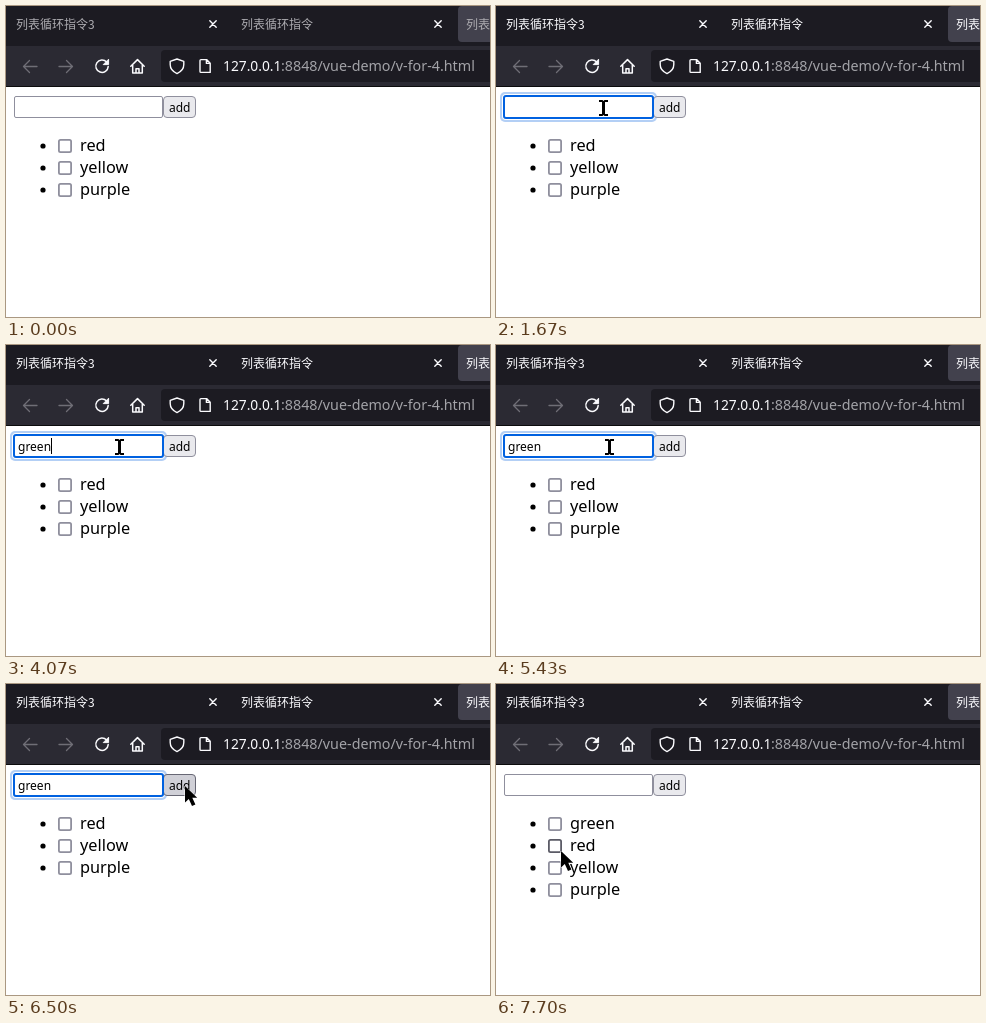
Write an HTML page that moves like this. It is 484 px wide and 311 px high and loops after 8 s.

```html
<!DOCTYPE html>
<html lang="zh">
<head>
<meta charset="utf-8">
<title>v-for</title>
<style>
  html, body { margin: 0; width: 100%; height: 100%; overflow: hidden; background: #fff; }
  svg { display: block; width: 484px; height: 311px; }
  text { white-space: pre; }
  .tab { font: 500 12px "Noto Sans CJK SC", "Noto Sans CJK", sans-serif; }
  .url { font: 14.3px "Noto Sans", sans-serif; fill: #a3a3a8; }
  .host { font-size: 13.8px; fill: #fbfbfe; }
  .small { font: 12px "Noto Sans", sans-serif; }
  .item { font: 16.3px "Noto Sans", sans-serif; }
  .icon { fill: none; stroke: #fbfbfe; stroke-width: 1.5; stroke-linecap: round; stroke-linejoin: round; }
</style>
</head>
<body>
<svg viewBox="0 0 484 311">
  <rect width="484" height="311" fill="#fff"/>
  <rect width="484" height="40" fill="#1c1b22"/>
  <rect x="452" y="0" width="40" height="36" rx="4" fill="#42414d"/>
  <g id="tabs" class="tab">
    <text x="10" y="22.5">列表循环指令3</text>
    <text x="235" y="22.5">列表循环指令</text>
    <text x="460" y="22.5">列表循环指令</text>
  </g>
  <rect y="40" width="484" height="40" fill="#2b2a33"/>
  <rect y="80" width="484" height="1" fill="#0c0c0d"/>
  <rect x="155" y="44" width="340" height="32" rx="4" fill="#1c1b22"/>

  <g class="icon">
    <path stroke-width="1.4" d="M203.8 14.8l6.4 6.4m0-6.4l-6.4 6.4M428.8 14.8l6.4 6.4m0-6.4l-6.4 6.4"/>
    <path stroke="#6f6e76" stroke-width="1.3" d="M31 60.5H17.5m6-6l-6 6 6 6M53 60.5H66.5m-6-6l6 6-6 6"/>
    <path d="M100.6 56A6.2 6.2 0 1 0 102.2 60.6"/>
    <path fill="#fbfbfe" stroke-width="1" d="M102.6 53.6v5h-5z"/>
    <path d="M124.8 60.2L131.5 53.6l6.7 6.6M126.7 59v8h9.6v-8M130 67v-4.2h3V67"/>
    <path stroke-width="1.4" d="M171 53l6.8 2.4v3.2c0 4.2-2.6 7.2-6.8 9-4.2-1.8-6.8-4.8-6.8-9v-3.2z"/>
    <path stroke-width="1.4" d="M195 53.6h5.6l3.6 3.6v9.2h-9.2a1 1 0 0 1-1-1V54.6a1 1 0 0 1 1-1zM200.4 53.8v3.6h3.6"/>
  </g>
  <text class="url" y="65"><tspan class="host" x="217">127.0.0.1</tspan><tspan x="275">:8848/vue-demo/v-for-4.html</tspan></text>

  <g id="ring">
    <rect x="4" y="86" width="157" height="30" rx="5" fill="#b3cff5"/>
    <rect x="6" y="88" width="153" height="26" rx="4" fill="#fff"/>
  </g>
  <rect id="btn" x="157.5" y="90.5" width="32" height="21" rx="3.5"/>
  <text class="small" x="163" y="106">add</text>
  <rect id="field" fill="#fff"/>
  <text id="typed" class="small" x="12" y="106"></text>
  <rect id="caret" y="93" width="1" height="16"/>
  <g id="list"></g>

  <path id="beam" d="M-4.5 -8.5H-1L0 -7.5 1 -8.5H4.5V-6.5H1.5V5.5H4.5V7.5H1L0 6.5-1 7.5H-4.5V5.5H-1.5V-6.5H-4.5z"/>
  <path id="arrow" stroke="#fff" stroke-width="1" paint-order="stroke" d="M0 0V16.5L3.8 13 7 20 10.4 18.5 7.3 11.8H12.2z"/>
</svg>
<script>
const LOOP = 8000, STEP = 100 / 3;
const FOCUS = 1130, BLUR = 6700, ADDED = 6770;
const WORD = "green", COLORS = ["red", "yellow", "purple"];
const KEYS = [2430, 2670, 3000, 3170, 4070];
const CARET_X = [12, 19, 24, 31, 38, 45];
const BLINK = [1130, 1670, 2200, 2770, 3000, 3300, 3830, 4370, 4900, 5430, 5970, 6500];
// pointer path: time, x, y, ease-out power
const PATH = [
  [500, 463, 238, 1], [930, 100, 102, 2],
  [1640, 100, 102, 1], [1700, 113, 102, 1],
  [5970, 113, 102, 1], [6230, 146, 94, 1.2], [6500, 179, 102, 1.6],
  [7070, 179, 102, 1], [7170, 130, 123, 1], [7700, 65, 167, 1.6]
];
const $ = id => document.getElementById(id);
const set = (el, attrs) => { for (const k in attrs) el.setAttribute(k, attrs[k]); };
const show = (el, on) => set(el, { visibility: on ? "visible" : "hidden" });
const count = (times, t) => times.filter(v => v <= t).length;

function make(tag, attrs, parent) {
  const el = document.createElementNS("http://www.w3.org/2000/svg", tag);
  set(el, attrs);
  return parent.appendChild(el);
}

const rows = [0, 1, 2, 3].map(i => {
  const g = make("g", { transform: `translate(0 ${i * 22})` }, $("list"));
  make("circle", { cx: 37, cy: 140, r: 2.6 }, g);
  const box = make("rect", { x: 52.9, y: 133.9, width: 12.2, height: 12.2, rx: 1.6, fill: "#fff", "stroke-width": 1.8 }, g);
  const label = make("text", { class: "item", x: 74, y: 145 }, g);
  return { g, box, label };
});

function pointer(t) {
  const i = PATH.findIndex(p => p[0] > t);
  if (i < 0) return PATH[PATH.length - 1].slice(1, 3);
  if (i === 0) return [-99, -99];
  const [t0, x0, y0] = PATH[i - 1], [t1, x1, y1, pow] = PATH[i];
  const p = 1 - (1 - (t - t0) / (t1 - t0)) ** pow;
  return [x0 + (x1 - x0) * p, y0 + (y1 - y0) * p].map(Math.round);
}

function draw(ms) {
  // screen updates land on a 30 Hz grid
  const t = Math.round(Math.floor((ms + 4) / STEP) * STEP / 10) * 10;
  const [x, y] = pointer(t);
  const over = (l, top, r, b) => x >= l && x < r && y >= top && y < b;
  const focused = t >= FOCUS && t < BLUR, added = t >= ADDED;
  const inField = over(8, 90, 157, 112), inBtn = over(157, 90, 190, 112);
  const pressed = t >= BLUR && t < ADDED;

  set($("tabs"), { fill: t < FOCUS ? "#adacb1" : "#fbfbfe" });
  show($("ring"), focused);
  set($("field"), focused
    ? { x: 8, y: 90, width: 149, height: 22, rx: 2, stroke: "#0061e0", "stroke-width": 2 }
    : { x: 8.5, y: 90.5, width: 148, height: 21, rx: 1.5, stroke: inField ? "#5b5b66" : "#8f8f9d", "stroke-width": 1 });
  set($("btn"), {
    fill: pressed ? "#b1b1b9" : inBtn ? "#d0d0d7" : "#e9e9ed",
    stroke: pressed ? "#484851" : inBtn ? "#676774" : "#8f8f9d"
  });

  const n = added ? 0 : count(KEYS, t);
  $("typed").textContent = WORD.slice(0, n);
  set($("caret"), { x: CARET_X[n] });
  show($("caret"), focused && count(BLINK, t) % 2 === 1);

  const items = added ? [WORD, ...COLORS] : COLORS;
  rows.forEach(({ g, box, label }, i) => {
    show(g, i < items.length);
    label.textContent = items[i] || "";
    const top = 133 + i * 22;
    set(box, { stroke: over(52, top, 66, top + 14) ? "#5b5b66" : "#8f8f9d" });
  });

  show($("beam"), inField);
  show($("arrow"), x > 0 && !inField);
  set($("beam"), { transform: `translate(${x + 0.5} ${y + 0.5})` });
  set($("arrow"), { transform: `translate(${x} ${y})` });
}

const start = performance.now();
function tick() {
  draw((performance.now() - start) % LOOP);
  requestAnimationFrame(tick);
}
tick();
</script>
</body>
</html>
```
